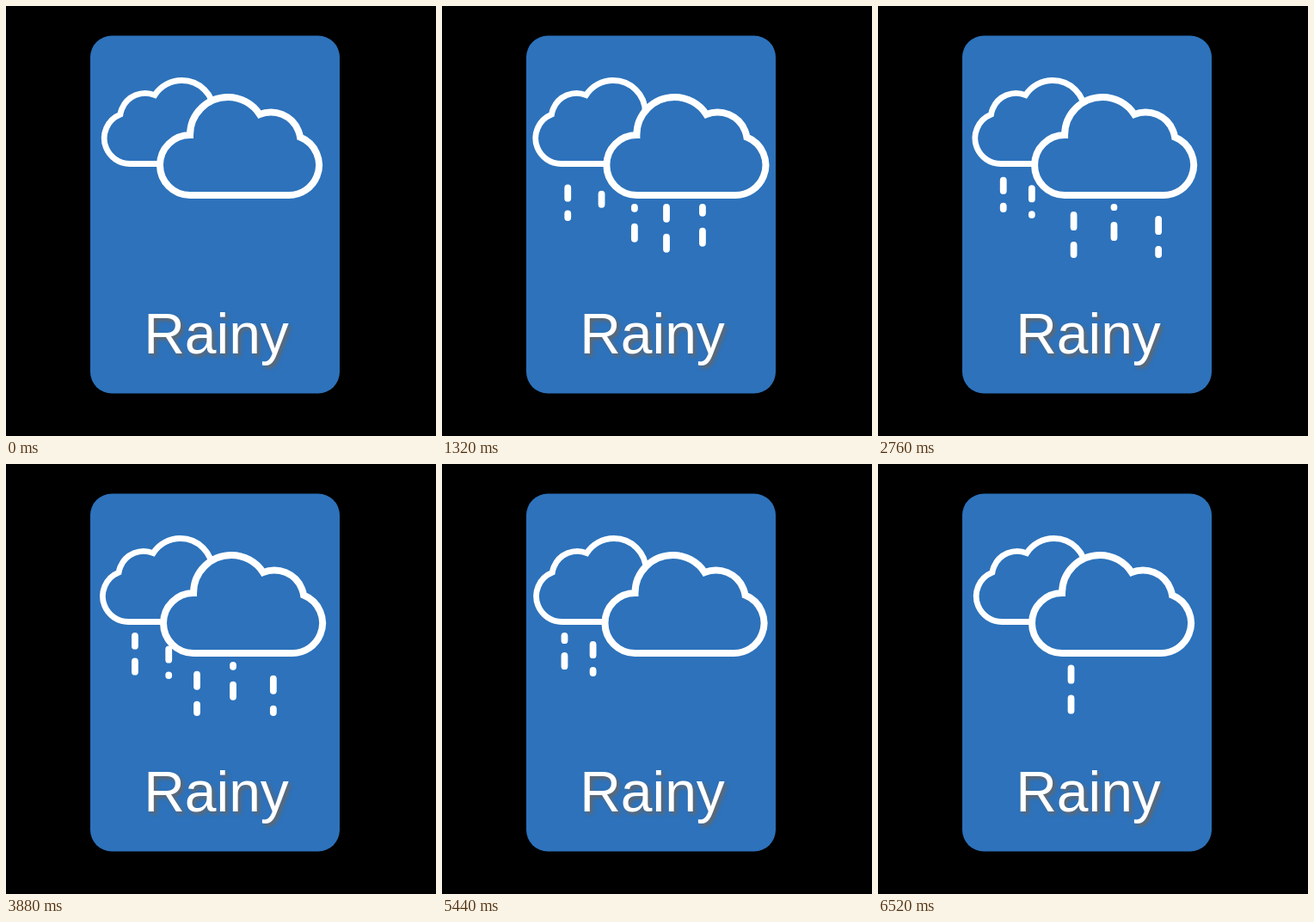
Write an HTML page with a canvas that moves like this. It is 500 px wide and 500 px high and loops after 6560 ms.

```html
<!DOCTYPE html>
<html lang="en">
<head>
<meta charset="utf-8">
<title>Rainy</title>
<style>
  html, body { margin: 0; width: 100%; height: 100%; overflow: hidden; background: #000; }
  canvas { display: block; width: 500px; height: 500px; }
</style>
</head>
<body>
<canvas id="stage" width="500" height="500"></canvas>
<script>
const ctx = document.getElementById('stage').getContext('2d');
const LOOP = 3280;
const BLUE = '#2d72bb';
const CAP = 3.9;

// Cloud lobes from left to right
const lobes = [
  { x: 214, y: 185, r: 35 },
  { x: 258, y: 150, r: 44 },
  { x: 308, y: 158, r: 34.5 },
  { x: 329, y: 185, r: 35 }
];

// Upper crossing point of two neighbouring lobes
function crossing(p, q) {
  const dx = q.x - p.x, dy = q.y - p.y, d = Math.hypot(dx, dy);
  const along = (p.r ** 2 - q.r ** 2 + d * d) / (2 * d);
  const up = Math.sqrt(p.r ** 2 - along ** 2);
  return { x: p.x + (along * dx + up * dy) / d, y: p.y + (along * dy - up * dx) / d };
}

const angleTo = (lobe, point) => Math.atan2(point.y - lobe.y, point.x - lobe.x);

function drawCloud() {
  ctx.beginPath();
  lobes.forEach((lobe, i) => {
    const prev = lobes[i - 1], next = lobes[i + 1];
    const from = prev ? angleTo(lobe, crossing(prev, lobe)) : Math.PI / 2;
    const to = next ? angleTo(lobe, crossing(lobe, next)) : Math.PI / 2;
    ctx.arc(lobe.x, lobe.y, lobe.r, from, to);
  });
  ctx.closePath();
  ctx.lineWidth = 8;
  ctx.fillStyle = BLUE;
  ctx.fill();
  ctx.stroke();
}

// A dashed line with rounded ends, clipped to top..bottom
function drawColumn({ x, top, bottom, dash, gap, start }) {
  const step = dash + gap;
  ctx.beginPath();
  for (let y = start - Math.ceil((start + dash - top) / step) * step; y < bottom; y += step) {
    const a = Math.max(y, top) + CAP;
    const b = Math.min(y + dash, bottom) - CAP;
    if (b < a - 0.5) continue;
    ctx.moveTo(x, a);
    ctx.lineTo(x, Math.max(b, a + 0.01));
  }
  ctx.stroke();
}

function nearColumn(k, i, t) {
  const drift = 7.5 * Math.sin(k * Math.PI * 4 / 3);
  return {
    x: 218 + drift + (42 + 0.75 * drift) * i + 2.4 * i * (i - 1),
    top: 230, bottom: 293, dash: 22, gap: 13,
    start: 239 + (12 * i) % 19 + 0.0615 * (t - 573),
    end: i ? 800 : 1060
  };
}

function farColumn(k, i, t) {
  const d = t - 360;
  return {
    x: 151.7 - 4.6 * k + (39.3 - 6.2 * k) * i,
    top: 196 + 4 * i, bottom: 250 - k * (10 - 7 * i), dash: 20, gap: 10,
    start: 205 + 19 * i + (0.092 - 0.0124 * i) * d - 0.000028 * d * d,
    end: 1360
  };
}

// Showers take turns, evenly spread over the loop
function drawRain(time, showers, columns, column) {
  ctx.lineWidth = 2 * CAP;
  ctx.lineCap = 'round';
  for (let k = 0; k < showers; k++) {
    const t = (time - k * LOOP / showers + LOOP) % LOOP;
    for (let i = 0; i < columns; i++) {
      const line = column(k, i, t);
      if (t >= 200 && t < line.end) drawColumn(line);
    }
  }
}

function drawCard() {
  ctx.fillStyle = '#000';
  ctx.fillRect(0, 0, 500, 500);
  ctx.fillStyle = BLUE;
  ctx.beginPath();
  ctx.roundRect(98, 34.5, 290, 416, 25);
  ctx.fill();
}

function drawLabel() {
  ctx.save();
  ctx.shadowColor = '#666';
  ctx.shadowOffsetX = 3;
  ctx.shadowOffsetY = 3;
  ctx.shadowBlur = 4;
  ctx.fillStyle = '#fff';
  ctx.font = '66px "Liberation Sans", Arial, sans-serif';
  ctx.textAlign = 'center';
  ctx.fillText('Rainy', 244.5, 404);
  ctx.restore();
}

function draw(time) {
  const sway = (1 - Math.cos(2 * Math.PI * time / LOOP)) / 2;

  drawCard();
  ctx.strokeStyle = '#fff';

  ctx.save();
  ctx.translate(-6 * sway, 0);
  drawRain(time, 2, 2, farColumn);
  // The far cloud is a smaller mirror of the near one
  ctx.translate(424, -3.7);
  ctx.scale(-0.851, 0.851);
  drawCloud();
  ctx.restore();

  ctx.save();
  ctx.translate(13.6 * sway, 0);
  drawRain(time, 3, 3, nearColumn);
  drawCloud();
  ctx.restore();

  drawLabel();
}

const began = performance.now();
function tick() {
  draw((performance.now() - began) % LOOP);
  requestAnimationFrame(tick);
}
tick();
</script>
</body>
</html>
```
